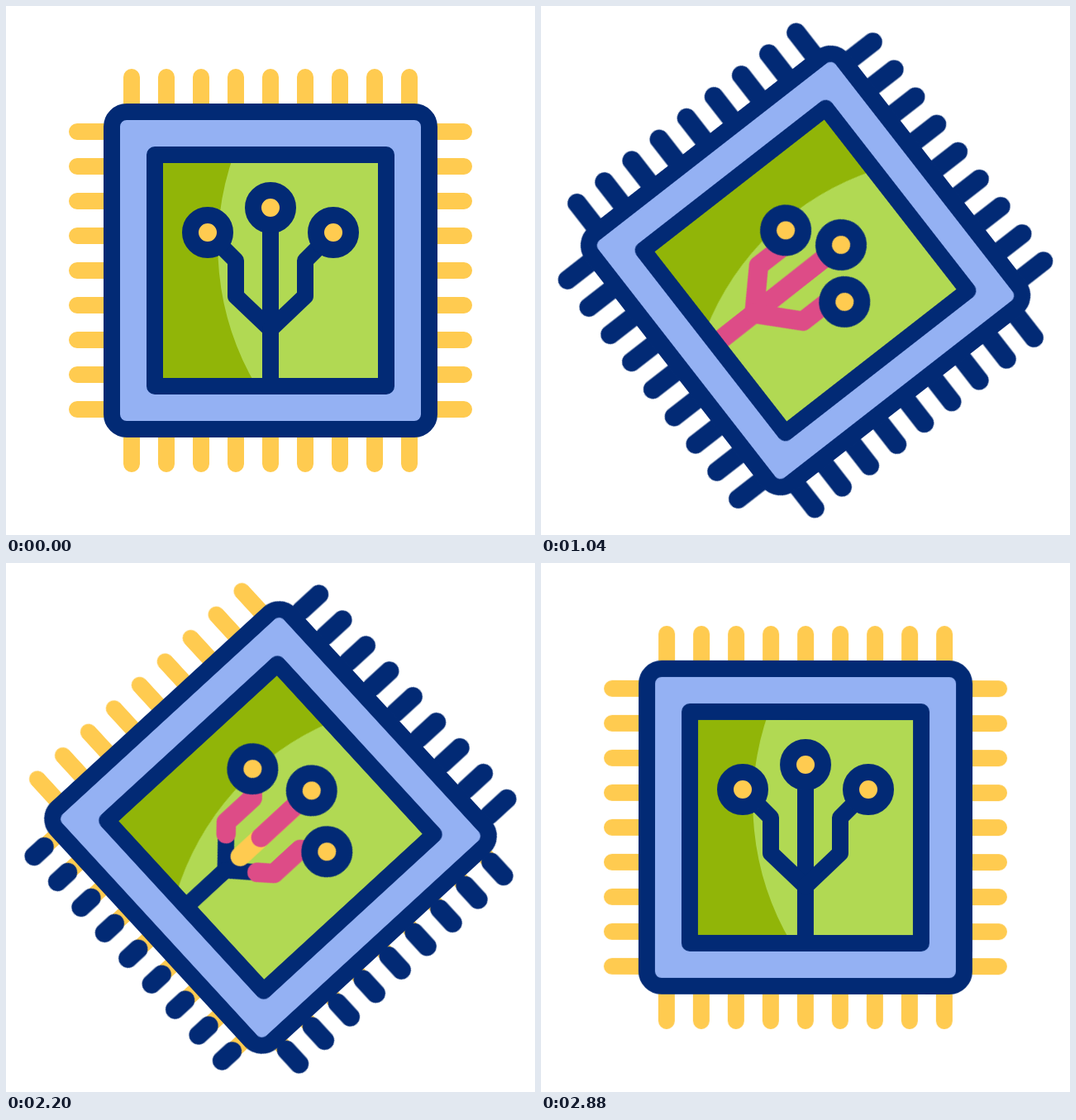
An HTML page for the animation above (3 s loop, 640 by 640 pixels).

```html
<!DOCTYPE html>
<html lang="en">
<head>
<meta charset="utf-8">
<title>Chip</title>
<style>
  :root {
    --navy: #022a75;
    --yellow: #ffcb50;
    --pink: #dd4c87;
    --settle: cubic-bezier(.33, 0, .2, 1);
  }
  html, body { margin: 0; width: 100%; height: 100%; overflow: hidden; background: #fff; }
  svg { display: block; width: 100%; height: 100%; }
  .chip, .chip * {
    animation-duration: 3s;
    animation-iteration-count: infinite;
    animation-timing-function: cubic-bezier(.33, 0, .67, 1);
  }
  .chip { animation-name: turn; animation-timing-function: cubic-bezier(.9, 0, .1, 1); }

  .pins, .tree { fill: none; stroke-width: 20; stroke-linecap: round; stroke-linejoin: round; }
  .pins { stroke: var(--yellow); }
  .pins.lit { stroke: var(--navy); stroke-width: 23; stroke-dasharray: 44 200; }
  .lit .left { animation-name: pins-left; }
  .lit .bottom { animation-name: pins-bottom; }
  .lit .right { animation-name: pins-right; }
  .lit .top { animation-name: pins-top; }

  .tree { stroke: var(--navy); }
  .flow { stroke-width: 23.5; stroke-dasharray: 100 300; stroke: var(--pink); }
  .tail { stroke: var(--yellow); }
  .trunk { animation-name: trunk; }
  .west { animation-name: west; }
  .east { animation-name: east; }
  .flow.trunk { animation-name: trunk, flow-trunk; }
  .flow.west { animation-name: west, flow-branch; }
  .flow.east { animation-name: east, flow-branch; animation-delay: 0s, 20ms; animation-fill-mode: backwards; }
  .flow.tail { animation-name: trunk, flow-tail; }

  .frame { fill: none; stroke: var(--navy); stroke-width: 20; stroke-linejoin: round; }
  .nodes { fill: var(--yellow); stroke: var(--navy); stroke-width: 20; }
  .node-west { animation-name: node-west; }
  .node-mid { animation-name: node-mid; }
  .node-east { animation-name: node-east; }

  @keyframes turn {
    0%, 3.12%, 97.53%, 100% { transform: rotate(0deg); }
    43.12%, 59.07% { transform: rotate(53.4deg); }
  }

  /* strokes draw outwards, then withdraw from their base */
  @keyframes pins-left {
    0%, 2% { stroke-dashoffset: 45; animation-timing-function: var(--settle); }
    25.33%, 51% { stroke-dashoffset: 0; }
    74.33%, 100% { stroke-dashoffset: -45; }
  }
  @keyframes pins-bottom {
    0%, 3.33% { stroke-dashoffset: 45; animation-timing-function: var(--settle); }
    26.67%, 60% { stroke-dashoffset: 0; }
    83.33%, 100% { stroke-dashoffset: -45; }
  }
  @keyframes pins-right {
    0%, 5.33% { stroke-dashoffset: 45; animation-timing-function: var(--settle); }
    30.67%, 62.17% { stroke-dashoffset: 0; }
    85.5%, 100% { stroke-dashoffset: -45; }
  }
  @keyframes pins-top {
    0%, 9.33% { stroke-dashoffset: 45; animation-timing-function: var(--settle); }
    35.33%, 64.23% { stroke-dashoffset: 0; }
    87.57%, 100% { stroke-dashoffset: -45; }
  }
  @keyframes flow-trunk {
    0%, 6.67% { stroke-dashoffset: 101; }
    24%, 58% { stroke-dashoffset: 0; }
    85.67%, 100% { stroke-dashoffset: -101; }
  }
  @keyframes flow-branch {
    0%, 14% { stroke-dashoffset: 101; }
    26.67%, 65.33% { stroke-dashoffset: 0; }
    86.67%, 100% { stroke-dashoffset: -101; }
  }
  @keyframes flow-tail {
    0% { stroke-dashoffset: 101; animation-timing-function: step-end; }
    35%, 62.33% { stroke-dashoffset: 0; }
    87.2%, 100% { stroke-dashoffset: -101; }
  }

  /* the tree crouches while the chip is turned */
  @keyframes trunk {
    0%, 4%, 82%, 100% { d: path("M0 136L0 -76"); }
    24.33%, 62% { d: path("M3 136L2 -53"); }
  }
  @keyframes west {
    0%, 4%, 82%, 100% { d: path("M0 71L-42 31L-42 -12L-76 -46"); }
    24.33%, 62% { d: path("M3 81L-39.5 41L-39.5 -2L-53 -11"); }
  }
  @keyframes east {
    0%, 4%, 82%, 100% { d: path("M0 71L42 31L42 -12L76 -46"); }
    24.33%, 62% { d: path("M3 81L46.5 40L46.5 -3L59 -14"); }
  }
  @keyframes node-west {
    0%, 4%, 82%, 100% { transform: translate(0, 0); }
    24.33%, 62% { transform: translate(23px, 35px); }
  }
  @keyframes node-mid {
    0%, 4%, 82%, 100% { transform: translate(0, 0); }
    24.33%, 62% { transform: translate(2px, 23px); }
  }
  @keyframes node-east {
    0%, 8%, 83.33%, 100% { transform: translate(0, 0); }
    29.67%, 63% { transform: translate(-17px, 32px); }
  }
</style>
</head>
<body>
<svg viewBox="-320 -320 640 640">
  <defs>
    <path id="row" d="M-168-190v-44m42 44v-44m42 44v-44m42 44v-44m42 44v-44m42 44v-44m42 44v-44m42 44v-44m42 44v-44"/>
  </defs>
  <g class="chip">
    <g class="pins">
      <use href="#row"/>
      <use href="#row" transform="rotate(90)"/>
      <use href="#row" transform="rotate(180)"/>
      <use href="#row" transform="rotate(-90)"/>
    </g>
    <g class="pins lit">
      <use class="top" href="#row"/>
      <use class="right" href="#row" transform="rotate(90)"/>
      <use class="bottom" href="#row" transform="rotate(180)"/>
      <use class="left" href="#row" transform="rotate(-90)"/>
    </g>
    <rect x="-192" y="-192" width="384" height="384" rx="18" fill="#94b1f3" stroke="#022a75" stroke-width="20"/>
    <rect x="-140" y="-140" width="280" height="280" fill="#b1d953"/>
    <path d="M-140-140H-44.5A330 330 0 0 0-17 140H-140z" fill="#91b508"/>
    <g class="tree">
      <path class="trunk" d="M0 136L0-76"/>
      <path class="west" d="M0 71L-42 31L-42-12L-76-46"/>
      <path class="east" d="M0 71L42 31L42-12L76-46"/>
      <path class="flow tail" pathLength="100" d="M0 136L0-76"/>
      <path class="flow trunk" pathLength="100" d="M0 136L0-76"/>
      <path class="flow west" pathLength="100" d="M0 71L-42 31L-42-12L-76-46"/>
      <path class="flow east" pathLength="100" d="M0 71L42 31L42-12L76-46"/>
    </g>
    <rect class="frame" x="-140" y="-140" width="280" height="280"/>
    <g class="nodes">
      <circle class="node-west" cx="-76" cy="-46" r="21"/>
      <circle class="node-mid" cx="0" cy="-76" r="21"/>
      <circle class="node-east" cx="76" cy="-46" r="21"/>
    </g>
  </g>
</svg>
</body>
</html>
```
